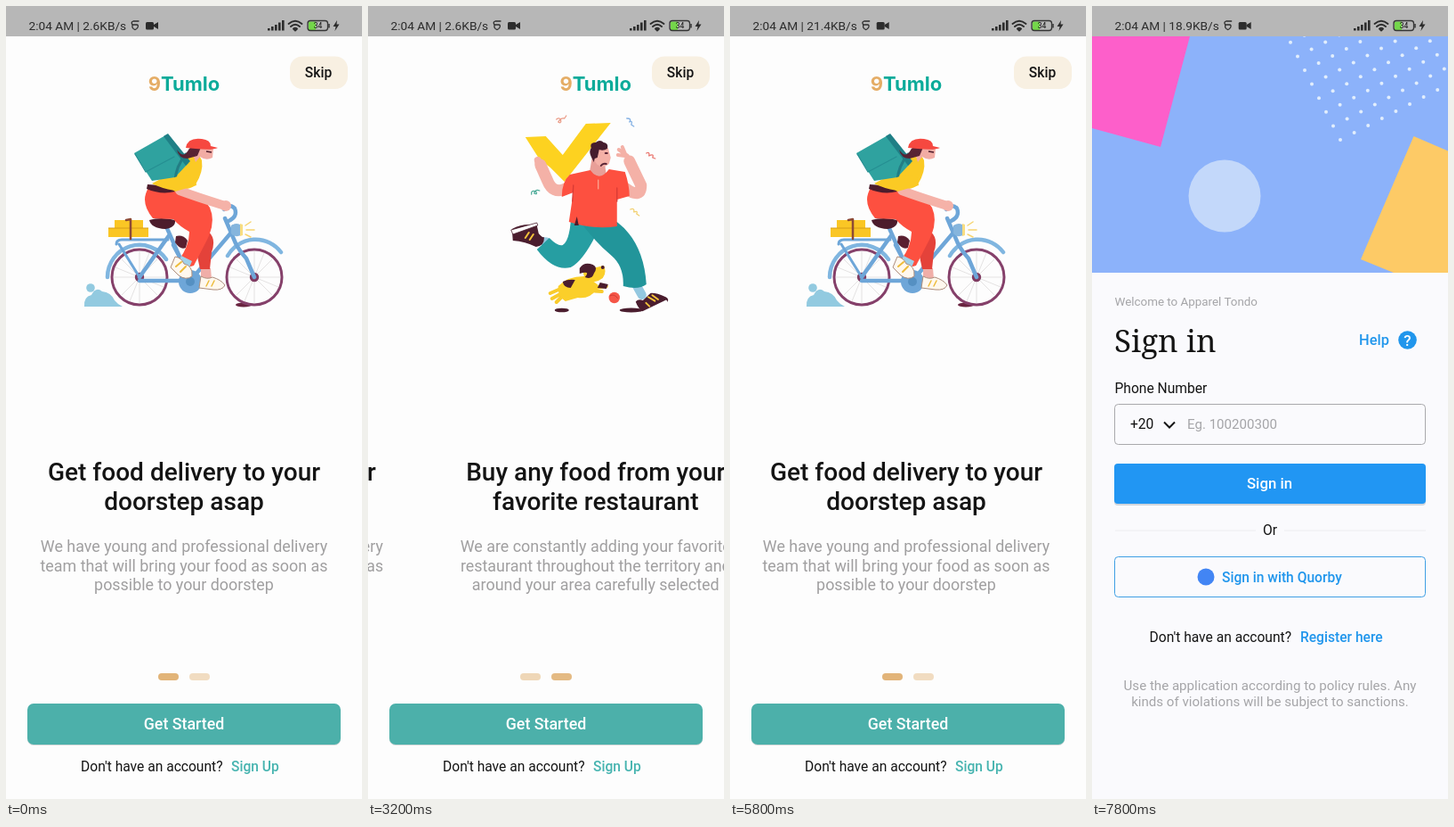
Write an HTML page that moves like this. It is 400 px wide and 889 px high and loops after 8 s.

```html
<!DOCTYPE html>
<html lang="en">
<head>
<meta charset="utf-8">
<title>Food delivery onboarding</title>
<style>
html, body { margin: 0; width: 100%; height: 100%; overflow: hidden; background: #fdfdfd; }
svg { display: block; width: 100vw; height: 100vh; }
text { font-family: Roboto, sans-serif; font-size: 15.6px; fill: #141414; }
.mid { text-anchor: middle; }
.med { font-weight: 500; }
.title { font-size: 28px; }
.body { font-size: 17.9px; fill: #a09fa0; }
.brand { font: 700 22px Inter, sans-serif; fill: #0cab9a; }
.link { font-weight: 500; fill: #47b4b0; }
.blue { font-weight: 500; fill: #2196ec; }
.faint { fill: #a5a5a8; }
.line { fill: none; stroke-linecap: round; stroke-linejoin: round; }
</style>
</head>
<body>
<svg viewBox="0 0 400 889" preserveAspectRatio="none">
<defs>
  <g id="brand"><text class="brand mid" x="200" y="95"><tspan fill="#e5ad66">9</tspan>Tumlo</text></g>
  <g id="wheel">
    <circle r="31" fill="#fdfdfd" stroke="#85406a" stroke-width="3"/>
    <path d="M-29 0H29M0-29V29M-20-20L20 20M-20 20L20-20M-27-11L27 11M11-27L-11 27" stroke="#d3d0d0" stroke-width=".6"/>
    <circle r="5.2" fill="#803c62"/>
  </g>
  <g id="shoe">
    <path d="M-17-6Q-13-8-9-4L2-8Q8-6 16 3Q19 7 15 9L-13 9Q-18 3-17-6Z" fill="#4a1d2e"/>
    <path d="M-15 7L15 6Q17 8 14 10L-13 10Z" fill="#fff"/>
    <path class="line" d="M-2-5L3 2M3-5L7 2M-7 0L-5 5" stroke="#f6c43a" stroke-width="2"/>
  </g>
  <clipPath id="hero"><path d="M0 34H400V299H0Z"/></clipPath>
</defs>

<rect width="400" height="889" fill="#fdfdfd"/>

<g id="ride">
  <use href="#brand"/>
  <path d="M88 337Q87 326 96 324Q101 314 108 320Q118 321 122 330Q126 335 131 337Z" fill="#92cae0"/>
  <circle cx="95" cy="316" r="4.8" fill="#92cae0"/>
  <ellipse cx="267" cy="335" rx="9" ry="2.5" fill="#6a2440"/>
  <use href="#wheel" x="150" y="304"/>
  <use href="#wheel" x="279" y="304"/>
  <g class="line" stroke="#6ea6d8" stroke-width="4.5">
    <path d="M114 304A36 36 0 0 1 180 284M249 280A36 36 0 0 1 309 276" stroke="#80b6e0"/>
    <path d="M124 267Q124 262 130 262H182M127 267L150 304" stroke-width="3"/>
    <path d="M150 304L184 256M180 247L207 308H150M207 308L253 254M188 268L207 304"/>
    <path d="M246 238L258 266Q262 274 270 283L279 304M248 242Q261 237 257 227Q252 221 245 228"/>
  </g>
  <circle cx="207" cy="309" r="13" fill="#6ea6d8"/>
  <circle cx="207" cy="309" r="5" fill="#5590c2"/>
  <path d="M122 240H154V249H122ZM115 249H160V259H115Z" fill="#fac625"/>
  <path d="M115 249H160" stroke="#d69d18"/>
  <path class="line" d="M135 240L140 239V261" stroke="#8d4a35" stroke-width="2.5"/>
  <path d="M253 246Q260 242 264 246V257Q257 260 253 255Z" fill="#85b5dd"/>
  <path d="M263 244L266 245V257L263 258Z" fill="#f8dd80"/>
  <path class="line" d="M269 246L275 242M270 251H279M269 256L275 259" stroke="#f6d470" stroke-width="1.5"/>
  <!-- far leg -->
  <path d="M191 258Q199 256 204 263L202 271Q196 274 190 265Z" fill="#591f30"/>
  <path d="M219 292L230 294L231 306L219 304Z" fill="#f0aea8"/>
  <path d="M219 303Q226 307 232 304Q242 307 246 313Q243 319 233 318L217 316Z" fill="#fff8ee" stroke="#ad8d7c" stroke-width="1"/>
  <path class="line" d="M228 308L225 314M234 308L231 314" stroke="#edbc3c" stroke-width="1.5"/>
  <path d="M217 248Q239 254 231 276L229 295H218L214 276Z" fill="#e4423a"/>
  <!-- seat and near leg -->
  <path d="M161 240Q174 236 190 240Q191 248 179 250Q163 249 161 240Z" fill="#4c1c2c"/>
  <path d="M160 204Q176 210 190 206Q218 209 229 226Q236 242 226 262L211 291Q202 295 194 285Q206 269 206 253Q195 247 188 239L165 238Q150 220 160 204Z" fill="#fd5040"/>
  <path d="M197 280L209 286L206 293L194 286Z" fill="#a0d0e8"/>
  <path d="M190 281Q197 282 200 289Q210 291 209 303Q202 308 194 302L185 293Z" fill="#fff8ee" stroke="#ad8d7c" stroke-width="1"/>
  <path class="line" d="M197 287L191 292M202 292L196 298" stroke="#edbc3c" stroke-width="2"/>
  <!-- rider -->
  <path d="M159 200L188 202L190 208Q174 212 158 205Z" fill="#4c1c2c"/>
  <path d="M205 168Q214 160 220 173Q222 186 213 200Q211 205 190 207Q173 204 164 199Q188 188 205 168Z" fill="#fbca24"/>
  <path d="M144 165L181 144L205 176L190 192L164 196Z" fill="#2fa29f"/>
  <path d="M177 146L182 143L207 174L202 179Z" fill="#1f7f86"/>
  <path d="M145 166L157 186L189 169" class="line" stroke="#258f92" stroke-width="1.3"/>
  <path class="line" d="M202 166Q191 180 190 195" stroke="#237d84" stroke-width="3"/>
  <path class="line" d="M195 207Q214 214 243 223" stroke="#f5b2a8" stroke-width="10"/>
  <circle cx="247" cy="224" r="6" fill="#f5b2a8"/>
  <path d="M180 201Q187 187 212 191L214 201L190 208Z" fill="#fbca24"/>
  <path d="M215 159H233L232 170Q225 174 218 169L213 175L210 166Z" fill="#f2aca4"/>
  <path d="M220 156Q207 155 204 163Q199 171 192 161Q194 171 204 171L215 168Z" fill="#582334"/>
  <path d="M202 159Q204 147 220 149Q230 150 230 157L238 159Q232 162 213 160Z" fill="#f64840"/>
  <path d="M225 163L231 164" stroke="#4c1c2c" stroke-width="1.5"/>
  <text class="title med mid" y="532"><tspan x="200">Get food delivery to your</tspan><tspan x="200" dy="32.6">doorstep asap</tspan></text>
  <text class="body mid" y="612"><tspan x="200">We have young and professional delivery</tspan><tspan x="200" dy="21.5">team that will bring your food as soon as</tspan><tspan x="200" dy="21.5">possible to your doorstep</tspan></text>
</g>

<g id="buy">
  <use href="#brand"/>
  <g class="line" stroke-width="1.3">
    <path d="M156 127Q160 124 161 129Q161 132 158 130Q161 125 165 126L167 123" stroke="#ea9c88"/>
    <path d="M235 126Q241 126 238 130Q242 128 240 133L243 135" stroke="#86b2e4"/>
    <path d="M257 165Q261 163 260 168Q266 165 264 170L267 171" stroke="#ea7770"/>
    <path d="M128 211Q127 206 133 208Q135 212 131 210Q132 205 137 207" stroke="#4cab98"/>
    <path d="M239 228Q244 226 243 231Q248 229 246 233L249 235" stroke="#f2d070"/>
  </g>
  <ellipse cx="162" cy="341" rx="8" ry="2.3" fill="#4a1d2e"/>
  <ellipse cx="240" cy="341" rx="13" ry="2.5" fill="#4a1d2e"/>
  <!-- raised arms and tick -->
  <path class="line" d="M233 204Q251 217 251 201L238 174" stroke="#f4b1a7" stroke-width="13"/>
  <path class="line" d="M235 170L230 158M236 168L226 161M233 168L225 167" stroke="#f4b1a7" stroke-width="4"/>
  <path d="M121 147L144 146L163 167L189 132L217 131L165 197L149 181L137 172Z" fill="#fdd220"/>
  <path class="line" d="M166 205Q152 211 146 196L138 178" stroke="#f4b1a7" stroke-width="13"/>
  <path class="line" d="M137 181L135 173" stroke="#f4b1a7" stroke-width="8"/>
  <!-- legs -->
  <path class="line" d="M145 264L135 263" stroke="#94c8e0" stroke-width="9"/>
  <path class="line" d="M243 308L252 324" stroke="#94c8e0" stroke-width="10"/>
  <path d="M172 242H207Q189 284 172 293Q153 298 134 273L148 260Q158 270 163 268Q170 264 172 242Z" fill="#269ea2"/>
  <path d="M183 242H224Q254 265 257 312Q248 319 231 314Q232 292 218 280Q198 263 183 242Z" fill="#22959a"/>
  <path d="M106 250Q119 243 134 246L136 255Q140 260 142 259Q143 269 133 270Q121 264 107 263Z" fill="#4a1d2e"/>
  <path d="M105 251L134 243L135 246L107 256Z" fill="#fff" stroke="#4a1d2e" stroke-width=".8"/>
  <path class="line" d="M121 260L125 254M126 262L130 256" stroke="#f6c43a" stroke-width="2"/>
  <use href="#shoe" transform="translate(263 330) rotate(-24)"/>
  <!-- torso and head -->
  <path d="M196 170L210 174L212 190L205 194L193 187Z" fill="#e89f98"/>
  <path d="M194 184Q204 198 215 183L233 186Q238 201 238 213L224 217V247Q197 251 170 242L175 209L162 214Q162 197 171 189Z" fill="#fd5040"/>
  <path class="line" d="M175 201L174 219M224 204V219" stroke="#d83a34" stroke-width="1.3"/>
  <path d="M179 236L176 246H181Z" fill="#4c1c2c"/>
  <path class="line" d="M203 195V205" stroke="#fcbca8" stroke-width="1"/>
  <path d="M200 160L214 159L217 170L215 177Q209 183 202 178L196 170Z" fill="#f4b1a7"/>
  <path d="M195 169Q192 163 195 159Q193 153 200 153Q205 149 209 153Q215 154 213 160Q209 163 204 161L202 170L199 171L198 175Z" fill="#451d2e"/>
  <path class="line" d="M206 179Q208 176 212 177M211 165L213 165" stroke="#5a2536" stroke-width="2"/>
  <!-- dog -->
  <path class="line" d="M162 322L151 328M166 322L156 332M194 317L212 314M192 319L207 320M163 316L149 322" stroke="#f9cb2c" stroke-width="4"/>
  <path d="M158 314Q169 302 190 303L203 313Q197 329 180 327L166 331Q157 325 158 314Z" fill="#fbcf2a"/>
  <path d="M163 309Q169 306 177 307L172 316Q164 316 163 309ZM205 310L214 312L212 317L202 316Z" fill="#4a1d2e"/>
  <path d="M186 299Q189 291 201 293L209 291Q213 298 208 305Q198 313 188 306Z" fill="#fbcf2a"/>
  <path d="M182 294Q187 286 197 290Q203 293 198 300Q196 307 188 304Q195 296 182 300Z" fill="#4a1d2e"/>
  <circle cx="208" cy="293" r="2" fill="#4a1d2e"/>
  <circle cx="221" cy="327" r="6.2" fill="#f55648"/>
  <path d="M216 325Q221 322 225 328" fill="none" stroke="#d03c34"/>
  <text class="title med mid" y="532"><tspan x="200">Buy any food from your</tspan><tspan x="200" dy="32.6">favorite restaurant</tspan></text>
  <text class="body mid" y="612"><tspan x="200">We are constantly adding your favorite</tspan><tspan x="200" dy="21.5">restaurant throughout the territory and</tspan><tspan x="200" dy="21.5">around your area carefully selected</tspan></text>
</g>

<rect x="319" y="56.5" width="65" height="36.5" rx="14" fill="#f8f0e2"/>
<text class="med mid" x="351" y="80">Skip</text>
<g id="dots" fill="#e2b478">
  <rect x="171" y="748" width="23" height="8" rx="4"/>
  <rect x="206" y="748" width="23" height="8" rx="4"/>
</g>
<rect x="24" y="784" width="352" height="45" rx="7" fill="#d8dada"/>
<rect x="24" y="782" width="352" height="46" rx="7" fill="#4cb0aa"/>
<rect id="press" x="24" y="782" width="352" height="46" rx="7" fill="#fff"/>
<text class="med mid" x="200" y="810.5" style="font-size:17.8px;fill:#fff">Get Started</text>
<text x="84" y="858">Don't have an account?</text>
<text class="link" x="253" y="858">Sign Up</text>

<g id="login">
  <rect width="400" height="889" fill="#fafafd"/>
  <g clip-path="url(#hero)">
    <rect width="400" height="299" fill="#8cb2fa"/>
    <path d="M0 0H119L77 158L0 137Z" fill="#fd5fca"/>
    <path d="M361.500 146L420 171V332L302 284Z" fill="#fdca66"/>
    <circle cx="149" cy="213" r="40.5" fill="#c3d8fa"/>
    <g id="specks" fill="#e2eefc"></g>
  </g>
  <text class="faint" x="25.5" y="336" style="font-size:13.4px">Welcome to Apparel Tondo</text>
  <text x="25" y="388" style="font:35px 'Noto Serif',serif">Sign in</text>
  <text class="blue" x="300" y="380" style="font-size:16.4px">Help</text>
  <circle cx="354.5" cy="374.5" r="10.3" fill="#2196ec"/>
  <text class="med mid" x="354.5" y="380.5" style="font-size:17px;fill:#fff">?</text>
  <text x="25.5" y="434">Phone Number</text>
  <rect x="25.5" y="446.5" width="349" height="45" rx="4" fill="none" stroke="#a9a9ac"/>
  <text x="43" y="474">+20</text>
  <path d="M81 466.5L87 472.5L93 466.5" fill="none" stroke="#141414" stroke-width="2"/>
  <text class="faint" x="107" y="473.5" style="font-size:15.1px">Eg. 100200300</text>
  <rect x="25" y="515" width="350" height="45" rx="4" fill="#d2d6dc"/>
  <rect x="25" y="513" width="350" height="45" rx="4" fill="#2196f3"/>
  <text class="med mid" x="199.5" y="541" style="font-size:16.8px;fill:#fff">Sign in</text>
  <path d="M26 588H184M216 588H375" stroke="#ececf0"/>
  <text class="mid" x="200" y="593">Or</text>
  <rect x="25.5" y="617.5" width="349" height="45" rx="4" fill="none" stroke="#3f9fe4"/>
  <circle cx="128" cy="640" r="9.5" fill="#4285f4"/>
  <text class="blue" x="146" y="645.5">Sign in with Quorby</text>
  <text x="64.5" y="713">Don't have an account?</text>
  <text class="blue" x="234" y="713">Register here</text>
  <text class="faint mid" y="767" style="font-size:15.1px"><tspan x="200">Use the application according to policy rules. Any</tspan><tspan x="200" dy="17.5">kinds of violations will be subject to sanctions.</tspan></text>
</g>

<rect width="400" height="34" fill="#b7b7b7"/>
<text id="clock" x="25.5" y="27" style="font-size:13.7px;fill:#2c2c2c"></text>
<g id="icons" fill="#2c2c2c">
  <path class="line" d="M149 17H143Q140 18 142 21H147Q149 21 148 24Q145 29 142 24V21" stroke="#2c2c2c" stroke-width="1.3"/>
  <rect x="157" y="18" width="9" height="8.5" rx="1.5"/><path d="M166 21L171 18V26L166 23Z"/>
</g>
<path d="M294 25h2.6v2.5h-2.6zM298 23h2.6v4.5h-2.6zM302 21h2.6v6.5h-2.6zM306 18.5h2.6v9h-2.6zM310 16h2.6v11.5h-2.6z" fill="#2c2c2c"/>
<path class="line" d="M317.5 20Q325 13.5 332.5 20M320 23Q325 18.5 330 23M323 25.5Q325 24 327 25.5L325 27.5Z" stroke="#2c2c2c" stroke-width="1.9"/>
<path d="M340 17.5H348V27.5H340Z" fill="#74d64a"/>
<rect x="339" y="16.5" width="22.5" height="11" rx="3" fill="none" stroke="#353535" stroke-width="1.3"/>
<path d="M363 20V24.5" stroke="#353535" stroke-width="1.5"/>
<text class="mid" x="350.5" y="25" style="font-size:8.5px">34</text>
<path d="M372 16L367.5 23H370.5L369.5 28L374.5 20.5H371.5Z" fill="#2c2c2c"/>
</svg>

<script>
const $ = id => document.getElementById(id);
const LOOP = 8000;
// [time in ms, scroll offset in px]
const swipe = [[0, 0], [2900, 0], [3000, 110], [3200, 344], [3400, 393], [3600, 400],
  [4900, 400], [5000, 385], [5200, 305], [5400, 171], [5600, 22], [5800, 2], [6000, 0], [LOOP, 0]];

const ramp = (t, a, b) => Math.min(1, Math.max(0, (t - a) / (b - a)));

function sample(keys, t) {
  const i = keys.findIndex(k => k[0] > t);
  const [t0, v0] = keys[i - 1], [t1, v1] = keys[i];
  return v0 + (v1 - v0) * (t - t0) / (t1 - t0);
}

let specks = '';
for (let i = 0; i < 12; i++)
  for (let j = 0; j < 13; j++)
    specks += `<circle cx="${279 + 15.6 * i - 8 * j}" cy="${150 - 8 * i - 15.6 * j}" r="2"/>`;
$('specks').innerHTML = specks;

function draw(t) {
  const x = sample(swipe, t), page = x / 400;
  $('ride').setAttribute('transform', `translate(${-x})`);
  $('buy').setAttribute('transform', `translate(${400 - x})`);
  const [left, right] = $('dots').children;
  left.setAttribute('opacity', 1 - .55 * page);
  right.setAttribute('opacity', .45 + .55 * page);

  $('press').setAttribute('opacity', .2 * ramp(t, 7100, 7350));
  const open = 1 - (1 - ramp(t, 7350, 7700)) ** 3, s = .9 + .1 * open;
  $('login').setAttribute('opacity', open);
  $('login').setAttribute('transform', `translate(${200 * (1 - s)} ${444.5 * (1 - s)}) scale(${s})`);

  const rate = t < 4100 ? '2.6' : t < 7400 ? '21.4' : '18.9';
  $('clock').textContent = `2:04 AM | ${rate}KB/s`;
  $('icons').setAttribute('transform', `translate(${rate.length > 3 ? 7.7 : 0})`);
}

const start = performance.now();
function tick() {
  draw((performance.now() - start) % LOOP);
  requestAnimationFrame(tick);
}
tick();
</script>
</body>
</html>
```
